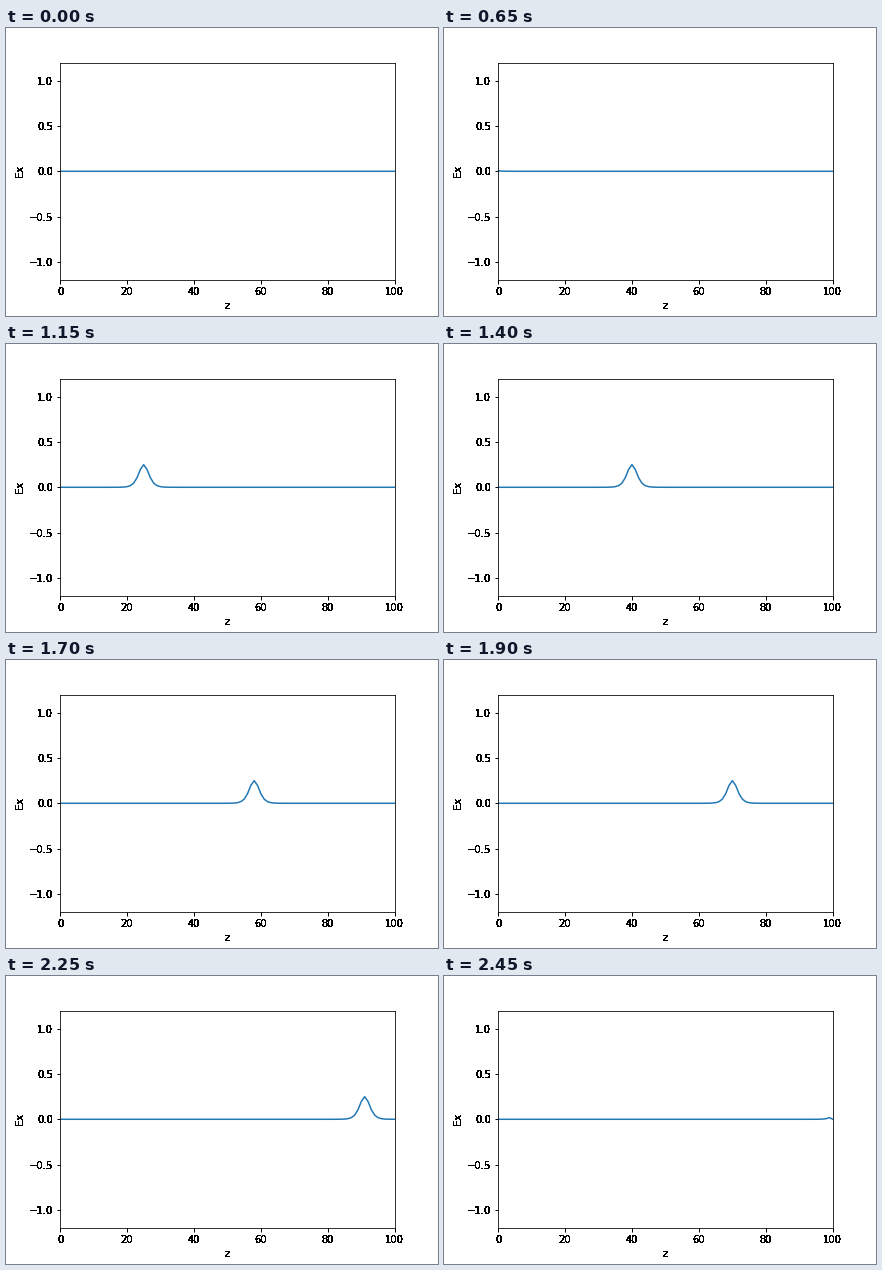
These frames come from a looping animation (432x288 px, 2.5 s). A matplotlib script:

```python
import numpy as np
import matplotlib.pyplot as plt
from matplotlib.animation import FuncAnimation

FRAMES = 50
INTERVAL = 50       # ms
CELLS = 100
SPEED = 3           # cells per frame
START = -44         # pulse centre at time zero


def field(i):
    """Logistic pulse moving right; the last node is held at zero."""
    ex = 0.25 / np.cosh((z - START - SPEED * i) / 2) ** 2
    ex[-1] = 0
    return ex


def harden(img, dpi):
    """Turn soft text edges into solid black."""
    img[..., :3] = 0
    img[..., 3] = img[..., 3] > 0.1
    return img, 0, 0


z = np.arange(CELLS + 1.0)

fig, ax = plt.subplots(figsize=(6, 4), dpi=72, facecolor="white")
fig.subplots_adjust(left=0.125, right=0.9, bottom=0.125, top=0.88)
ax.set(xlim=(0, CELLS), ylim=(-1.2, 1.2), xlabel="z", ylabel="Ex")
ax.set_xticks(range(0, 101, 20))
ax.set_yticks([-1, -0.5, 0, 0.5, 1])
ax.tick_params(width=1)

labels = ax.get_xticklabels() + ax.get_yticklabels()
for text in labels + [ax.xaxis.label, ax.yaxis.label]:
    text.set_agg_filter(harden)

line, = ax.plot(z, field(0), color="#1f77b4", lw=1.5, snap=False)


def update(i):
    line.set_ydata(field(i))
    return line,


anim = FuncAnimation(fig, update, frames=FRAMES, interval=INTERVAL,
                     repeat=True, repeat_delay=0)
plt.show()
```
